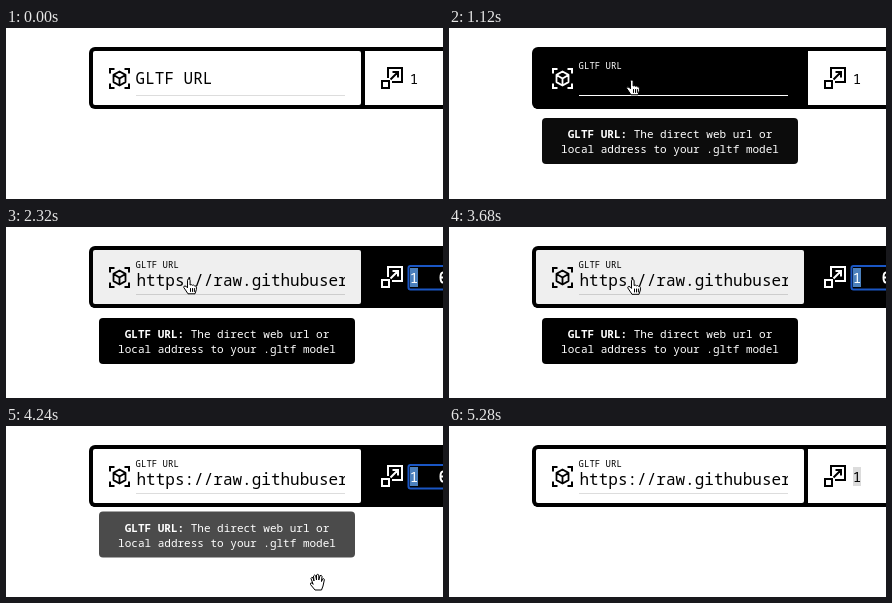
These frames come from a looping animation (437x171 px, 5360 ms). An HTML page:

```html
<!DOCTYPE html>
<html lang="en">
<head>
<meta charset="utf-8">
<title>GLTF URL field</title>
<style>
html, body { margin: 0; width: 100%; height: 100%; overflow: hidden; background: #fff }
svg { display: block; font-family: "Roboto Mono", "Noto Sans Mono", "DejaVu Sans Mono", monospace; white-space: pre }
.line { fill: none; stroke: currentColor; stroke-width: 2 }
</style>
</head>
<body>
<svg width="437" height="171" viewBox="0 0 437 171">
  <rect x="83" y="19" width="380" height="62" rx="6"/>
  <g id="left">
    <rect id="leftBg" x="87" y="23" width="268" height="54" rx="2"/>
    <g class="line" transform="translate(113.5 50.5)">
      <path d="M-9.5-5V-9.5H-5M5-9.5H9.5V-5M9.5 5V9.5H5M-5 9.5H-9.5V5"/>
      <path d="M0-7 6-3.6V3.6L0 7-6 3.6V-3.6ZM-6-3.6 0 0 6-3.6M0 0V7" stroke-width="1.8" stroke-linejoin="round"/>
    </g>
    <text id="label" x="129.6" fill="currentColor">GLTF URL</text>
    <svg x="130" y="40" width="209" height="26">
      <text id="url" x="0.5" y="19" font-size="16" fill="currentColor">https://raw.githubusercontent</text>
    </svg>
    <rect id="caret" x="131" y="42" width="1" height="21" fill="currentColor"/>
    <rect id="underline" x="130" y="67" width="209" height="1"/>
  </g>
  <g id="right">
    <rect id="rightBg" x="359" y="23" width="78" height="54"/>
    <path class="line" d="M382 50V40H396V54H386M376 53H383V60H376ZM384.5 51.5 392 44M386.5 44H392V49.5"/>
    <g id="focus">
      <rect x="402.5" y="39" width="50" height="23.5" rx="2" fill="#000" stroke="#1a56c4" stroke-width="2"/>
      <path class="line" d="M440 45.5H437Q434.5 45.5 434.5 50.5T437 55.5H440M434 50.5H440"/>
    </g>
    <rect id="selection" x="404" y="41" width="8" height="19"/>
    <text x="403.8" y="56" font-size="14" fill="currentColor">1</text>
  </g>
  <g id="tip">
    <rect x="93" y="91" width="256" height="46" rx="4"/>
    <g fill="#fff" font-size="11" font-weight="500" text-anchor="middle">
      <text x="221" y="111"><tspan font-weight="700">GLTF URL:</tspan> The direct web url or</text>
      <text x="221" y="126">local address to your .gltf model</text>
    </g>
  </g>
  <g id="cursor" fill="#fff" stroke="#000" stroke-linejoin="round" stroke-linecap="round">
    <path id="point" d="M-2.5 1V-6.2a1.3 1.3 0 0 1 2.6 0V-1.5q1.2-1 2.3.3 1.2-.8 2.1.5 1.7-.4 1.9 1.3V3L5 7.3H-2L-6.3.8q0-2 2-1.2ZM.5 2V5M2.5 2V5M4.4 2V5"/>
    <path id="palm" d="M-4 2-6-3.5q.5-1.8 2-.8L-3-1-3.5-6q1-1.8 2.2-.2L-.5-2V-7q1.3-1.4 2.3 0V-2L3-6.3q1.4-1 2 .5L4.5-.5 5.5-3q1.5-1 1.9.6L6 4 4.5 8H-2L-6.5 2.5q-.5-1.9 1-1.7Z"/>
  </g>
</svg>
<script>
const LOOP = 5360, STEP = 80;
const $ = id => document.getElementById(id);
const ramp = (t, a, b) => Math.min(1, Math.max(0, (t - a) / (b - a)));
const ease = x => x * x * (3 - 2 * x);
const mix = (a, b, k) => a + (b - a) * k;
const grey = v => `rgb(${[v, v, v].map(Math.round)})`;
const show = (id, on) => $(id).style.display = on ? '' : 'none';

// time, x, y
const path = [
  [80, 316, 157], [160, 300, 142], [240, 262, 108], [320, 216, 74], [400, 192, 60], [480, 192, 60],
  [720, 184, 59.5], [3600, 184, 59.5], [3680, 185, 60], [3840, 202, 68], [4000, 255, 104],
  [4160, 299, 142], [4240, 311, 156], [4320, 315, 157]
];

function cursorAt(t) {
  const i = Math.max(1, path.findIndex(p => p[0] >= t));
  const [a, b] = [path[i - 1], path[i]];
  const k = ramp(t, a[0], b[0]);
  return [mix(a[1], b[1], k), mix(a[2], b[2], k)];
}

function draw(now) {
  const t = Math.floor(now % LOOP / STEP) * STEP;
  const left = ease(ramp(t, 480, 720)) - ease(ramp(t, 2000, 2320));
  const hover = ramp(t, 480, 640) - ramp(t, 3920, 4240);
  const right = t < 5280 ? ease(ramp(t, 2000, 2320)) : 0;

  $('left').style.color = grey(255 * left);
  $('leftBg').style.fill = grey((255 - 16 * hover) * (1 - left));
  $('underline').style.fill = grey(mix(221 - 16 * hover, 255, left));
  const lift = ease(ramp(t, 480, 720));
  $('label').setAttribute('y', mix(56, 41, lift));
  $('label').setAttribute('font-size', mix(16, 9, lift));
  show('caret', t >= 640 && t < 880 || t >= 1440 && t < 1600);
  show('url', t >= 1600);

  $('right').style.color = grey(255 * right);
  $('rightBg').style.fill = grey(255 * (1 - right));
  $('rightBg').setAttribute('x', mix(359, 355, right));
  $('focus').style.opacity = right;
  show('selection', t >= 2080);
  $('selection').style.fill = t < 5280 ? '#4b80bd' : '#dcdcdc';

  const tip = ramp(t, 960, 1040) * .6 + ramp(t, 1040, 1120) * .35 + ramp(t, 1120, 1200) * .05
    - ramp(t, 4160, 4240) * .3 - ramp(t, 4240, 4400) * .7;
  $('tip').style.opacity = tip;
  $('tip').setAttribute('transform', `translate(0 ${-18 * (1 - tip)})`);

  const visible = t >= 80 && t < 4400;
  show('cursor', visible);
  if (visible) {
    const [x, y] = cursorAt(Math.min(t, 4320));
    $('cursor').setAttribute('transform', `translate(${x} ${y})`);
    show('point', y < 81);
    show('palm', y >= 81);
  }
}

const start = performance.now();
(function tick() {
  draw(performance.now() - start);
  requestAnimationFrame(tick);
})();
</script>
</body>
</html>
```
